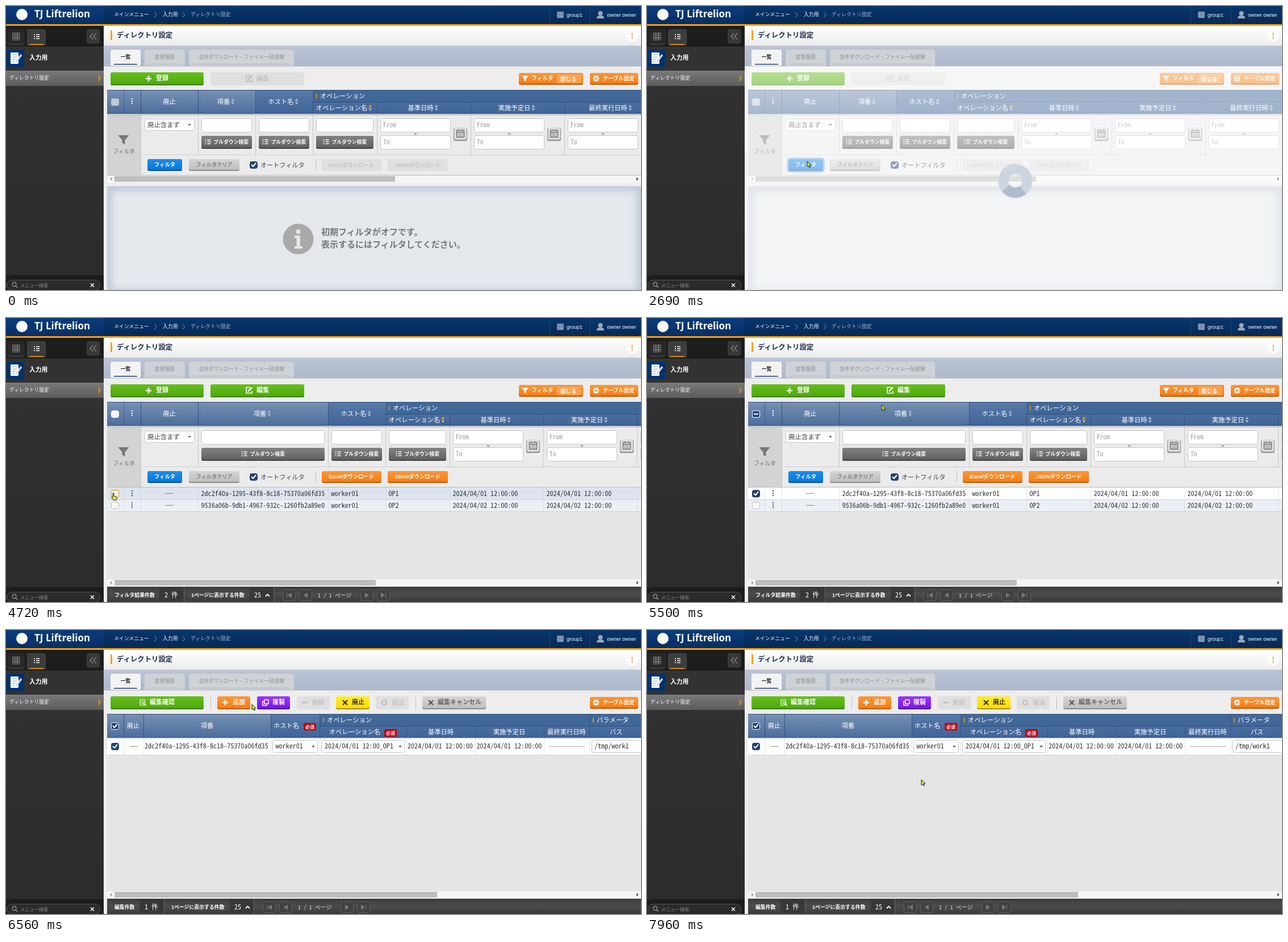
An HTML page that plays this animation: 1118 px wide and 501 px high, repeating every 7990 ms.

```html
<!DOCTYPE html>
<html lang="ja">
<head>
<meta charset="utf-8">
<title>ディレクトリ設定</title>
<style>
html, body { margin: 0; width: 100%; height: 100%; overflow: hidden; background: #e8e8e8; }
svg { display: block; }
text { font-family: "Noto Sans CJK JP", "Noto Sans CJK", sans-serif; white-space: pre; }
.m { font-family: "Noto Sans Mono CJK JP", "Noto Sans CJK JP", monospace; }
.a { font-family: "Liberation Sans", "Noto Sans CJK JP", sans-serif; }
.o { font-family: "Open Sans", sans-serif; }
.b { font-weight: 700; }
.c { text-anchor: middle; }
</style>
</head>
<body>
<svg id="stage" width="1118" height="501" viewBox="0 0 1118 501"></svg>
<script>
const LOOP = 7990;
const stage = document.getElementById('stage');

// drawing helpers
const rect = (x, y, w, h, fill, r = 0) => `<rect x="${x}" y="${y}" width="${w}" height="${h}" fill="${fill}" rx="${r}"/>`;
const box = (x, y, w, h, fill, line, r = 2) =>
  `<rect x="${x + .5}" y="${y + .5}" width="${w - 1}" height="${h - 1}" fill="${fill}" stroke="${line}" rx="${r}"/>`;
const text = (x, y, s, size, fill, cls = '') => `<text x="${x}" y="${y}" font-size="${size}" fill="${fill}" class="${cls}">${s}</text>`;
const line = (d, color, w = 1, more = '') => `<path d="${d}" fill="none" stroke="${color}" stroke-width="${w}" ${more}/>`;
const shape = (d, fill) => `<path d="${d}" fill="${fill}"/>`;
const disc = (x, y, r, fill) => `<circle cx="${x}" cy="${y}" r="${r}" fill="${fill}"/>`;
const at = (x, y, s) => `<g transform="translate(${x} ${y})">${s}</g>`;
const group = (id, s) => `<g id="${id}">${s}</g>`;
const grad = (id, ...colors) => `<linearGradient id="${id}" x2="0" y2="1">` +
  colors.map((c, i) => `<stop offset="${i / (colors.length - 1)}" stop-color="${c}"/>`).join('') + '</linearGradient>';

const defs = '<defs>' +
  grad('navy', '#0a3c7a', '#062f66') + grad('navyDark', '#08356c', '#062a58') +
  grad('item', '#7a7a7a', '#5c5c5c') + grad('side', '#333', '#2b2b2b') +
  grad('title', '#fff', '#ececec') + grad('tabs', '#b9c4d4', '#aebacc') +
  grad('green', '#66bf1c', '#4fa90d') + grad('lime', '#82cc44', '#69b82e') +
  grad('orange', '#ff9638', '#f57d12') + grad('blue', '#1a8fee', '#0878d8') +
  grad('purple', '#9a37ff', '#7a16e4') + grad('yellow', '#ffec2e', '#ffdc00') +
  grad('gray', '#d6d6d6', '#bebebe') + grad('dark', '#828282', '#606060') +
  grad('head', '#7790b3', '#4d6e9c') + grad('headB', '#587aa8', '#3f6497') +
  grad('foot', '#3c3c3c', '#4c4c4c', '#3a3a3a') +
  '<filter id="soft"><feGaussianBlur stdDeviation="7"/></filter></defs>';

// icons, centred on 0,0
const icon = {
  plus: c => line('M-5 0H5M0-5V5', c, 2.4),
  minus: c => line('M-5 0H5', c, 2.4),
  cross: c => line('M-4-4L4 4M4-4L-4 4', c, 2.2),
  ring: c => line('M-4 0a4 4 0 1 1 8 0a4 4 0 1 1-8 0', c, 2.2),
  edit: c => line('M2-5H-5V5H5V1', c, 1.6) + line('M-2 2L5-5', c, 2.6),
  verify: c => line('M3-1V-5H-5V5H0M-3-2H1M-3 1H-1', c, 1.2) + line('M0 2a2 2 0 1 1 4 0a2 2 0 1 1-4 0M4 4L6 6', c, 1.4),
  copy: c => line('M-2-5H5V2H-2ZM-3-2H-5V5H2V3', c, 1.5),
  funnel: c => shape('M-6-5H6L1.5 0.5V5L-1.5 3.5V0.5Z', c),
  gear: c => line('M-3 0a3 3 0 1 1 6 0a3 3 0 1 1-6 0', c, 2) +
    line('M0-3.5V-5.5M0 3.5V5.5M-3.5 0H-5.5M3.5 0H5.5M-2.5-2.5L-4-4M2.5 2.5L4 4M2.5-2.5L4-4M-2.5 2.5L-4 4', c, 2),
  list: c => line('M-5-3.5H-3M-5 0H-3M-5 3.5H-3M-1-3.5H5M-1 0H5M-1 3.5H5', c, 1.4),
  calendar: c => line('M-6.5-5.5H6.5V6.5H-6.5ZM-6.5-2.5H6.5M-3.5-7.5V-5M3.5-7.5V-5', c) +
    line('M-4.500-.5H5M-4.500 2H5M-4.500 4.500H5', c, 1, 'stroke-dasharray="1.500 1"'),
  kebab: c => [-4, 0, 4].map(y => disc(0, y, 1.2, c)).join(''),
  sort: (c, up = c) => shape('M-3-1L0-5.5L3-1Z', up) + shape('M-3 1L0 5.5L3 1Z', c),
  down: c => shape('M-3-1.5H3L0 2Z', c),
};

function button(x, y, w, h, fill, edge, label, tx, size, color = '#fff', art = '') {
  return rect(x, y + 1, w, h, edge, 3) + rect(x, y, w, h - 1, fill, 3) +
    text(tx, y + h / 2 + size * .36 - .5, label, size, color, 'a b') + art;
}
const flat = (x, y, w, h, label, tx, size, art = '') =>
  rect(x, y, w, h, '#dfdfdf', 3) + text(tx, y + h / 2 + size * .36, label, size, '#c2c2c2', 'a b') + art;

const tick = (x, y, c = '#fff') => line(`M${x - 3.5} ${y}l3 3l5-6`, c, 2);
const check = (x, y, on, edge = '#bbb') => on
  ? box(x - 7, y - 6, 14, 13, '#21426f', edge, 3) + tick(x - .5, y)
  : box(x - 7, y - 6, 14, 13, '#f7f7f7', edge, 3);

function frame() {
  let s = rect(0, 0, 1118, 32, 'url(#navyDark)') + rect(0, 0, 172, 32, 'url(#navy)') + rect(0, 32, 1118, 3, '#f5a010') +
    disc(28, 15, 10, '#fff') + text(50, 20, 'TJ Liftrelion', 17, '#fff', 'o b') +
    text(190, 18, 'メインメニュー', 8.9, '#fff') + text(276, 18, '入力用', 8.9, '#fff') + text(325, 18, 'ディレクトリ設定', 8.9, '#a9b8cd') +
    line('M261 11l4 4.5l-4 4.5M311 11l4 4.5l-4 4.5', '#8496b4') + rect(957, 0, 1, 32, '#22426f') + rect(1028, 0, 1, 32, '#22426f') +
    box(970, 10, 12, 11, '#5d7193', '#9aa8bd', 1) + line('M973 10V21M975 13H980M975 16H980M975 18.5H980', '#c2cbd9') +
    text(987, 19, 'group1', 9, '#fff', 'a') + disc(1046.5, 13, 4, '#9aa6b8') + shape('M1040 22q0-5 4-5h5q4 0 4 5Z', '#9aa6b8') +
    text(1058, 19, 'owner owner', 9, '#fff', 'a');

  // side menu
  s += rect(0, 35, 172, 466, 'url(#side)') + rect(0, 35, 172, 35, '#1d1d1d') + rect(2, 41, 31, 29, '#292929', 3) +
    box(37, 41, 33, 30, '#3c3c3c', '#484848', 3) + rect(41, 67, 25, 1.5, '#f5a010') + rect(5, 67, 25, 1, '#555') +
    at(54, 54, icon.list('#fff')) + box(142, 41, 23, 25, '#373737', '#404040', 3) + line('M153 48l-5 5.5l5 5.5M159 48l-5 5.5l5 5.5', '#8c8c8c', 1.2);
  for (let i = 0; i < 9; i++) s += box(11 + i % 3 * 4.5, 47 + (i / 3 | 0) * 4.5, 4.5, 4.5, 'none', '#777', 0);
  s += rect(0, 70, 172, 1, '#111') + rect(1, 77, 31, 31, '#00336c') + rect(8, 82, 14, 20, '#fff', 1) +
    line('M11 86H19M11 90H19M11 94H17M11 98H16', '#8aa0bd') + line('M18 98L27 86', '#fff', 3) + line('M18 98L27 86', '#7890b0', 1) +
    text(41, 95, '入力用', 10.8, '#fff', 'b') + rect(0, 114, 172, 27, 'url(#item)') + text(6, 130, 'ディレクトリ設定', 8.8, '#fff') +
    line('M162 123l4 4.5l-4 4.5', '#f5a010', 1.5) + rect(0, 475, 172, 26, '#1c1c1c') + box(1, 483, 165, 19, '#2b2b2b', '#555', 9) +
    line('M11 491a3.5 3.5 0 1 1 7 0a3.5 3.5 0 1 1-7 0M17 494l3 3', '#999', 1.3) + text(25, 495.5, 'メニュー検索', 8.2, '#888') +
    line('M149 489.5l6 6m0-6l-6 6', '#fff', 1.5);

  // title and tabs
  s += rect(172, 35, 946, 35, 'url(#title)') + rect(184, 43, 3, 17, '#f5a010') + text(195, 56, 'ディレクトリ設定', 12.4, '#1a2c50', 'b') +
    disc(1102.5, 52.5, 10, '#fff') + at(1102.5, 52.5, icon.kebab('#f58a10')) + rect(172, 70, 946, 36, 'url(#tabs)') +
    rect(172, 106, 946, 395, '#ededed');
  [[184, 53, '一覧', 1], [244, 71, '変更履歴'], [322, 185, '全件ダウンロード・ファイル一括登録']].forEach(([x, w, label, on]) => {
    s += rect(x, 77, w, 29, on ? '#f3f3f3' : '#cfd2d6', 3) + rect(x + 6, 102, w - 12, on ? 1.5 : 1, on ? '#1d3f78' : '#aeb2b8') +
      text(x + w / 2, 93, label, 8.9, on ? '#222' : '#8b8f95', on ? 'b c' : 'c');
  });
  return s + rect(172, 105.5, 946, 1, '#a9b3c2');
}

const settings = button(1028, 118, 85, 20, 'url(#orange)', '#b85c08', 'テーブル設定', 1051, 9.3, '#fff', at(1039, 128, icon.gear('#fff')));
const edit = (y, fill) => button(360, y, 165, 22, fill, '#3c8208', '編集', 441, 11, '#fff', at(428, y + 10.5, icon.edit('#fff')));

// list screen: idW is the width of the id column
function list(idW, ready) {
  const xs = [237, 338];
  [idW, 101, 113, 165, 165, 165].forEach(w => xs.push(xs[xs.length - 1] + w));
  const names = ['廃止', '項番', 'ホスト名', 'オペレーション名', '基準日時', '実施予定日', '最終実行日時'];
  const op = xs[3];
  let s = button(184, 117, 164, 22, 'url(#green)', '#3c8208', '登録', 264, 11, '#fff', at(251, 128, icon.plus('#fff'))) +
    (ready ? edit(117, 'url(#green)') : flat(360, 117, 165, 23, '編集', 441, 11, at(428, 128, icon.edit('#bbb')))) +
    button(903, 118, 113, 20, 'url(#orange)', '#b85c08', 'フィルタ', 925, 9.7, '#fff', at(914, 128, icon.funnel('#fff')) +
      box(969, 119, 45, 18, '#ffa04d', '#f08a2c', 2) + text(976, 131.5, '閉じる', 9.4, '#fff', 'b')) + settings;

  s += rect(178, 148, 940, 42, 'url(#head)') + rect(xs[2], 148, 1118 - xs[2], 42, 'url(#headB)') + rect(op, 148, 1118 - op, 21, '#426899') +
    rect(178, 148, 940, 1, '#34547f') + rect(op, 169, 1118 - op, 1, '#2c4d7c') + rect(178, 189, 940, 1, '#2c4d7c') + rect(207, 148, 1, 42, '#3d5d8a') +
    at(222, 168, icon.kebab('#fff')) + rect(op + 6, 155, 1.5, 8, '#f5a010') + text(op + 13, 163, 'オペレーション', 11.3, '#fff', 'm') +
    check(192, 169, false, ready ? '#fff' : '#b9c2ce') + (ready ? '' : rect(186, 164, 12, 11, '#c3c8d0', 2)) +
    rect(178, 190, 940, 3, '#c3c6ca') + rect(178, 193, 940, 106, '#ebebeb') + rect(178, 193, 59, 106, '#d3d3d3') +
    at(207, 236, `<g transform="scale(1.6)">${icon.funnel('#777')}</g>`) + text(207.5, 260, 'フィルタ', 9.7, '#666', 'c') +
    rect(237, 262, 881, 1, '#ccc') + rect(178, 298, 940, 1, '#bbb');

  names.forEach((name, i) => {
    const x = xs[i], w = xs[i + 1] - x, mid = x + w / 2;
    const y = i < 3 ? 173 : 184, tx = mid - (i ? 5.5 : 0);
    s += rect(x, i < 3 ? 148 : 170, 1, i < 3 ? 42 : 20, '#34547f') + text(tx, y, name, 11.3, '#fff', 'm c');
    if (i) s += at(tx + name.length * 5.65 + 5, y - 4.5, icon.sort('#a9bad2', i == 3 ? '#f5a010' : '#a9bad2'));
    s += rect(x, 193, 1, i ? 69 : 106, '#c8c8c8');
    if (!i) {
      s += box(244, 199, 88, 21, '#fff', '#c8c8c8') + text(249, 214, '廃止含まず', 11.4, '#444', 'm') + at(323, 209.5, icon.down('#666'));
    } else if (i < 4) {
      s += box(x + 6, 198, w - 12, 25, '#fff', '#c4c4c4', 3) + line(`M${x + 6} 225.5H${x + w - 6}`, '#bbb', 1, 'stroke-dasharray="2 2"') +
        button(x + 6, 229, w - 12, 22, 'url(#dark)', '#444', 'プルダウン検索', mid - 23, 8.8, '#fff', at(mid - 33, 239.5, icon.list('#fff')));
    } else {
      s += ['From', 'To'].map((t, k) => box(x + 6, 198 + k * 30, 124, 25, '#fff', '#c4c4c4', 3) + text(x + 11, 214 + k * 30, t, 11.3, '#999', 'm')).join('') +
        at(x + 68, 226, icon.down('#999')) + rect(x + 135, 215, 24, 23, '#8d8d8d', 3) + rect(x + 136, 214, 22, 22, '#dadada', 3) + at(x + 147, 225, icon.calendar('#555'));
    }
  });

  s += button(249, 270, 61, 20, 'url(#blue)', '#05529a', 'フィルタ', 261, 9.3) +
    button(322, 270, 89, 20, 'url(#gray)', '#8d8d8d', 'フィルタクリア', 334.5, 9.2, '#808080') +
    check(436, 280, true, '#21426f') + text(448, 284.5, 'オートフィルタ', 11.1, '#444', 'm') + rect(545, 270, 1, 20, '#bbb');
  [[556, 105, 'Excelダウンロード', 568], [672, 106, 'JSONダウンロード', 684]].forEach(([x, w, label, tx]) => {
    s += ready ? button(x, 270, w, 20, 'url(#orange)', '#b85c08', label, tx, 9.3) : flat(x, 270, w, 21, label, tx, 9.3);
  });
  if (!ready) return s + scrollbar(299, 685) + group('thumb', rect(191, 300, 495, 10, '#a2a2a2'));

  s += rect(178, 341, 940, 120, '#e5e5e5') + rect(178, 299, 940, 21, '#fff') + rect(178, 320, 940, 21, '#ebeff6') + group('hover', rect(178, 299, 940, 21, '#dde4ee'));
  [['2dc2f40a-1295-43f8-8c18-75370a06fd35', 1], ['9536a06b-9db1-4967-932c-1260fb2a89e0', 2]].forEach(([id, n]) => {
    const y = 292.5 + n * 21, day = `2024/04/0${n} 12:00:00`;
    s += rect(178, y + 6.5, 940, 1, '#cdd4de') + check(192, y - 4.5, false) + at(222, y - 4.5, icon.kebab('#3a5c94')) + rect(280, y - 4.5, 15, 1, '#888') +
      [id, 'worker01', 'OP' + n, day, day].map((t, i) => text(xs[i + 1] + 5.5, y, t, 12.1, '#333', 'm')).join('');
  });
  s += line([207, ...xs].filter(x => x < 1118).map(x => `M${x + .5} 299V341`).join(''), '#c3cbd8', 1, 'stroke-dasharray="2 2"');
  return s + scrollbar(461, 651) + footer('フィルタ結果件数', 2, 0) +
    group('focus', check(192, 309.5, false, '#f5920f')) +
    group('picked', check(192, 309.5, true, '#21426f') + box(185, 163, 14, 13, '#274877', '#fff', 3) + rect(188, 168.5, 8, 2, '#fff')) +
    group('editHover', rect(360, 117, 165, 24, '#ededed') + edit(118, 'url(#lime)'));
}

function scrollbar(y, end) {
  return rect(178, y, 940, 13, '#f4f4f4') + rect(191, y + 1, end - 191, 10, '#bdbdbd') +
    shape(`M186.5 ${y + 3}v6l-3.5-3Z`, '#999') + shape(`M1110 ${y + 3}v6l3.5-3Z`, '#444');
}

function footer(label, count, dx) {
  const pager = [[487, 'M4-4L-2 0L4 4ZM-4-4V4'], [516, 'M3-4L-3 0L3 4Z'], [624, 'M-3-4L3 0L-3 4Z'], [653, 'M-4-4L2 0L-4 4ZM4-4V4']];
  return rect(178, 474, 940, 27, 'url(#foot)') + text(191, 492, label, 8.9, '#fff', 'b') +
    at(dx, 0, rect(270, 474, 44, 27, '#383838') + rect(313, 474, 1, 27, '#666') + text(279, 493, count + ' 件', 12, '#fff', 'm') +
      text(326, 492, '1ページに表示する件数', 8.9, '#fff', 'a b') + rect(429, 474, 42, 27, '#383838') + rect(471, 474, 1, 27, '#666') +
      text(437, 493, '25', 12, '#fff', 'm') + line('M457 491l3.5-3.5l3.5 3.5', '#fff', 1.8) +
      pager.map(([x, d]) => box(x, 479, 23, 20, '#414141', '#5c5c5c') + at(x + 11.5, 489, shape(d, '#777') + line(d, '#777'))).join('') +
      text(549, 493, '1 / 1 ページ', 9.9, '#ddd', 'm'));
}

function editor() {
  const y = 117, badge = x => rect(x, 164, 22, 13, '#c4000c', 2) + text(x + 11, 173.5, '必須', 8, '#fff', 'b c');
  let s = button(184, y, 164, 22, 'url(#green)', '#3c8208', '編集確認', 253, 11, '#fff', at(241, 128, icon.verify('#fff'))) +
    rect(360, 118, 1, 22, '#bbb') + rect(721, 118, 1, 22, '#bbb') +
    button(372, y, 58, 22, 'url(#orange)', '#b85c08', '追加', 399, 11, '#fff', at(386, 128, icon.plus('#fff'))) +
    button(442, y, 58, 22, 'url(#purple)', '#520aa0', '複製', 469, 11, '#fff', at(457, 128, icon.copy('#fff'))) +
    flat(512, y, 58, 23, '削除', 539, 11, at(526, 128, icon.minus('#bbb'))) +
    button(581, y, 59, 22, 'url(#yellow)', '#a89000', '廃止', 609, 11, '#333', at(597, 128, icon.cross('#333'))) +
    flat(651, y, 58, 23, '復活', 679, 11, at(666, 128, icon.ring('#bbb'))) +
    button(733, y, 112, 22, 'url(#gray)', '#8d8d8d', '編集キャンセル', 760, 11, '#666', at(748, 128, icon.cross('#555'))) + settings;
  s += rect(178, 148, 940, 42, 'url(#head)') + rect(466, 148, 652, 42, 'url(#headB)') + rect(552, 148, 566, 21, '#426899') +
    rect(178, 148, 940, 1, '#34547f') + rect(552, 169, 566, 1, '#2c4d7c') + rect(178, 189, 940, 1, '#2c4d7c') +
    check(192, 169, true, '#fff') + badge(524) + text(471, 173, 'ホスト名', 11.3, '#fff', 'm');
  [[224, 173, '廃止'], [354, 173, '項番'], [614, 184, 'オペレーション名'], [765.5, 184, '基準日時'], [886, 184, '実施予定日'], [987, 184, '最終実行日時'], [1074, 184, 'パス']]
    .forEach(([x, ty, t]) => { s += text(x, ty, t, 11.3, '#fff', 'm c'); });
  s += at(142, 11, badge(524)) + [[552, 'オペレーション'], [1027, 'パラメータ']].map(([x, t]) =>
    rect(x + 6, 155, 1.5, 8, '#f5a010') + text(x + 13, 163, t, 11.3, '#fff', 'm')).join('');
  s += rect(178, 190, 940, 31, '#fff') + rect(178, 190, 940, 2, '#d5d9df') + rect(178, 220, 940, 1, '#cdd4de') + rect(178, 221, 940, 240, '#e5e5e5');
  [207, 242, 466, 552, 705, 826, 947, 1027].forEach((x, i) => {
    const top = i < 4 || i == 7 ? 148 : 170;
    s += rect(x, top, 1, 190 - top, '#34547f') + line(`M${x + .5} 191V220`, '#c3cbd8', 1, 'stroke-dasharray="2 2"');
  });
  s += check(192, 205, true, '#21426f') + rect(218, 205, 14, 1, '#888') + rect(957, 205, 62, 1, '#aaa') +
    box(469, 194, 80, 23, '#fff', '#c4c4c4', 3) + box(555, 194, 147, 23, '#fff', '#c4c4c4', 3) + box(1031, 194, 100, 23, '#fff', '#c4c4c4', 3) +
    at(541, 205.5, icon.down('#666')) + at(694, 205.5, icon.down('#666'));
  [[244, '2dc2f40a-1295-43f8-8c18-75370a06fd35'], [474.5, 'worker01'], [561, '2024/04/01 12:00_OP1'], [707, '2024/04/01 12:00:00'], [828.5, '2024/04/01 12:00:00'], [1036, '/tmp/work1']]
    .forEach(([x, t]) => { s += text(x, 209, t, 12.1, '#333', 'm'); });
  return s + scrollbar(461, 759) + footer('編集件数', 1, -35);
}

// message panel with a soft inner shadow
const panel = '<svg x="178" y="318" width="940" height="183">' + rect(0, 0, 940, 183, '#e4e8ec') +
  '<rect width="940" height="190" fill="none" stroke="#b9c5d4" stroke-width="14" filter="url(#soft)"/>' +
  box(0, 0, 940, 190, 'none', '#c0c9d5') + '</svg>';
const notice = disc(514.5, 411, 27, '#a9a9a9') + disc(514.5, 398, 4, '#e4e8ec') + shape('M508 405H518V424H522V428H508V424H511.5V409H508Z', '#e4e8ec') +
  text(555, 403.5, '初期フィルタがオフです。', 15, '#777', 'b') + text(555, 426, '表示するにはフィルタしてください。', 15, '#777', 'b');
const before = list(101, false) + panel + group('notice', notice);
const spinner = '<circle r="21" fill="none" stroke="#cdd5e1" stroke-width="18"/>' + line('M13.5 16.1A21 21 0 0 1-16.5 13', '#afbccf', 18);
const arrow = '<path d="M0 0V9.5L2.3 7.6L3.8 11L5.6 10.2L4.2 7H7Z" fill="#dfe23c" stroke="#222" stroke-width="1"/>';
const hand = '<path d="M0 0q1.2-1 2 0V5L6 6q1.5.5 1 2.5L6 12H1L-2.5 7.5q0-1.5 2.5 0Z" fill="#e6ea1c" stroke="#222" stroke-width="1"/>';

stage.innerHTML = defs + frame() + group('before', before) + group('after', list(229, true)) + group('editor', editor()) +
  group('ring', '<rect x="247.5" y="268.5" width="64" height="24" rx="4" fill="none" stroke="#3d8fe6" stroke-width="1.5"/>') +
  group('loading', '<rect x="172" y="106" width="946" height="395" fill="#fff" opacity=".5"/>' + at(648.5, 308.5, group('spin', spinner))) +
  group('cursor', group('glow', disc(1, 0, 8.5, '#e8e400')) + group('arrow', arrow) + group('hand', hand));

// rows: [ms, value, easing to the next row]
function track(id, prop, rows) {
  document.getElementById(id).animate(
    rows.map(([t, v, easing = 'linear']) => ({ offset: t / LOOP, [prop]: v, easing })),
    { duration: LOOP, iterations: Infinity });
}
// times switch the part on, off, on, ...
function show(id, ...times) {
  const rows = times.map((t, i) => [t, 1 - i % 2, 'step-end']);
  if (times[0] > 0) rows.unshift([0, 0, 'step-end']);
  track(id, 'opacity', [...rows, [LOOP, times.length % 2]]);
}

show('before', 0, 2960);
show('notice', 0, 2540);
show('thumb', 1840, 1930);
show('after', 2960, 6470);
show('ring', 2540, 4720);
show('hover', 4270, 5000);
show('focus', 4720, 4900);
show('picked', 4900);
show('editHover', 5740, 6470);
show('editor', 6470);
show('arrow', 110, 4480, 4960);
show('hand', 4480, 4960);
track('loading', 'opacity', [[0, 0], [2540, 0], [2660, 1], [2960, 1], [3120, 0], [LOOP, 0]]);
track('spin', 'transform', [[0, -54], [2540, -54], [2690, 0], [3120, 155], [LOOP, 155]].map(([t, a]) => [t, `rotate(${a}deg)`]));
track('glow', 'opacity', [[0, 0], [6260, 0], [6290, .8], [6380, .8], [6470, 0], [LOOP, 0]]);

const glide = 'cubic-bezier(.35,0,.35,1)';
track('cursor', 'transform', [
  [0, 1088, 494], [110, 1088, 494, 'cubic-bezier(.25,.4,.4,1)'], [530, 1028, 413, 'step-end'],
  [810, 1027, 413], [1060, 1027, 413, 'cubic-bezier(.45,0,.75,.8)'], [1510, 440, 334, 'cubic-bezier(.2,.48,.6,1)'],
  [1840, 300, 306, 'ease-out'], [2230, 282, 274], [3790, 282, 274, glide], [4510, 188, 309],
  [4900, 188, 309, 'cubic-bezier(.35,0,.4,.95)'], [5680, 431, 141, 'ease-out'], [5920, 432, 130], [6440, 432, 130],
  [6560, 433, 131], [7570, 433, 131, 'cubic-bezier(.4,0,.5,1)'], [7960, 483, 264], [LOOP, 483, 264],
].map(([t, x, y, ease]) => [t, `translate(${x}px, ${y}px)`, ease]));
</script>
</body>
</html>
```
